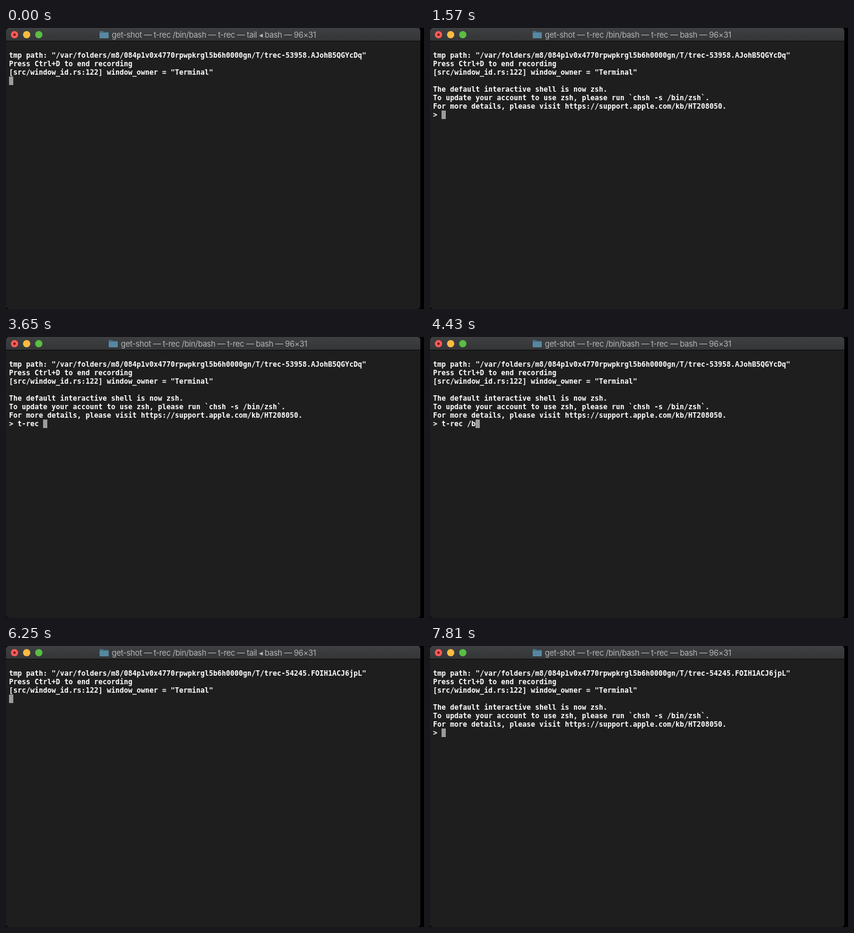
These frames come from a looping animation (688 by 463 pixels, 8000 ms). An HTML page:

```html
<!DOCTYPE html>
<html lang="en">
<meta charset="utf-8">
<title>Terminal recording</title>
<style>
html, body { margin: 0; width: 688px; height: 463px; overflow: hidden; background: #000; }
#window { position: absolute; width: 682px; height: 463px; border-radius: 5px; overflow: hidden; background: #1e1e1e; }
#bar { position: absolute; width: 100%; height: 21px; background: linear-gradient(#3e4042, #333537); border-bottom: 1px solid #0c0c0c; }
svg { position: absolute; left: 0; top: 0; }
#title { position: absolute; top: 2px; line-height: 18px; white-space: pre; color: #b3b4b5; font: 13px/18px Inter, sans-serif; letter-spacing: -.32px; }
pre { position: absolute; left: 5px; top: 38px; margin: 0; color: #fff; font: bold 11.63px/14px "DejaVu Sans Mono", monospace; letter-spacing: calc(7px - 1ch); }
#cursor { position: absolute; width: 7px; height: 14px; background: #9b9b9b; }
</style>
<div id="window">
  <div id="bar">
    <svg width="682" height="21">
      <circle cx="14" cy="11" r="6" fill="#fc5b57"/>
      <circle cx="14" cy="11" r="2" fill="#76100d"/>
      <circle cx="34" cy="11" r="6" fill="#fdbc40"/>
      <circle cx="54" cy="11" r="6" fill="#5abe42"/>
      <g id="folder">
        <path d="M0 6q0-1 1-1h4l2 1.5h7q1 0 1 1V16q0 1-1 1H1q-1 0-1-1z" fill="#456f88"/>
        <path d="M0 8h15v8q0 1-1 1H1q-1 0-1-1z" fill="#5887a1"/>
      </g>
    </svg>
    <div id="title"></div>
  </div>
  <pre id="text"></pre>
  <div id="cursor"></div>
</div>
<script>
const LOOP = 8000, SECOND_RUN = 6250;
const command = "t-rec /bin/bash";
// [time, characters typed]
const typing = [[2090, 1], [2610, 2], [2870, 4], [3130, 5], [3650, 6], [3910, 7],
  [4430, 8], [4690, 10], [4950, 11], [5220, 12], [5480, 14], [5740, 15]];
const welcome = `
The default interactive shell is now zsh.
To update your account to use zsh, please run \`chsh -s /bin/zsh\`.
For more details, please visit https://support.apple.com/kb/HT208050.
> `;
const header = id => `tmp path: "/var/folders/m8/084p1v0x4770rpwpkrgl5b6h0000gn/T/trec-${id}"
Press Ctrl+D to end recording
[src/window_id.rs:122] window_owner = "Terminal"
`;
const el = id => document.getElementById(id);

function draw(t) {
  const second = t >= SECOND_RUN;
  const age = second ? t - SECOND_RUN : t;
  const ready = age >= (second ? 520 : 530);
  const [process, left] = ready ? ["bash", 169]
    : age < 250 || second && age < 260 ? ["tail ◂ bash", 154] : ["bash ◂ bash", 149];

  let out = header(second ? "54245.FOIH1ACJ6jpL" : "53958.AJohB5QGYcDq");
  if (ready) out += welcome;
  if (!second) {
    const step = typing.filter(([at]) => at <= t).pop();
    if (step) out += command.slice(0, step[1]);
  }
  const lines = out.split("\n");

  el("text").textContent = out;
  el("cursor").style.left = 5 + 7 * lines.at(-1).length + "px";
  el("cursor").style.top = 38 + 14 * (lines.length - 1) + "px";
  el("title").textContent = `get-shot — t-rec /bin/bash — t-rec — ${process} — 96×31`;
  el("title").style.left = left + 20 + "px";
  el("folder").setAttribute("transform", `translate(${left} 0)`);
}

function tick() {
  draw(performance.now() % LOOP);
  requestAnimationFrame(tick);
}
tick();
</script>
</html>
```
